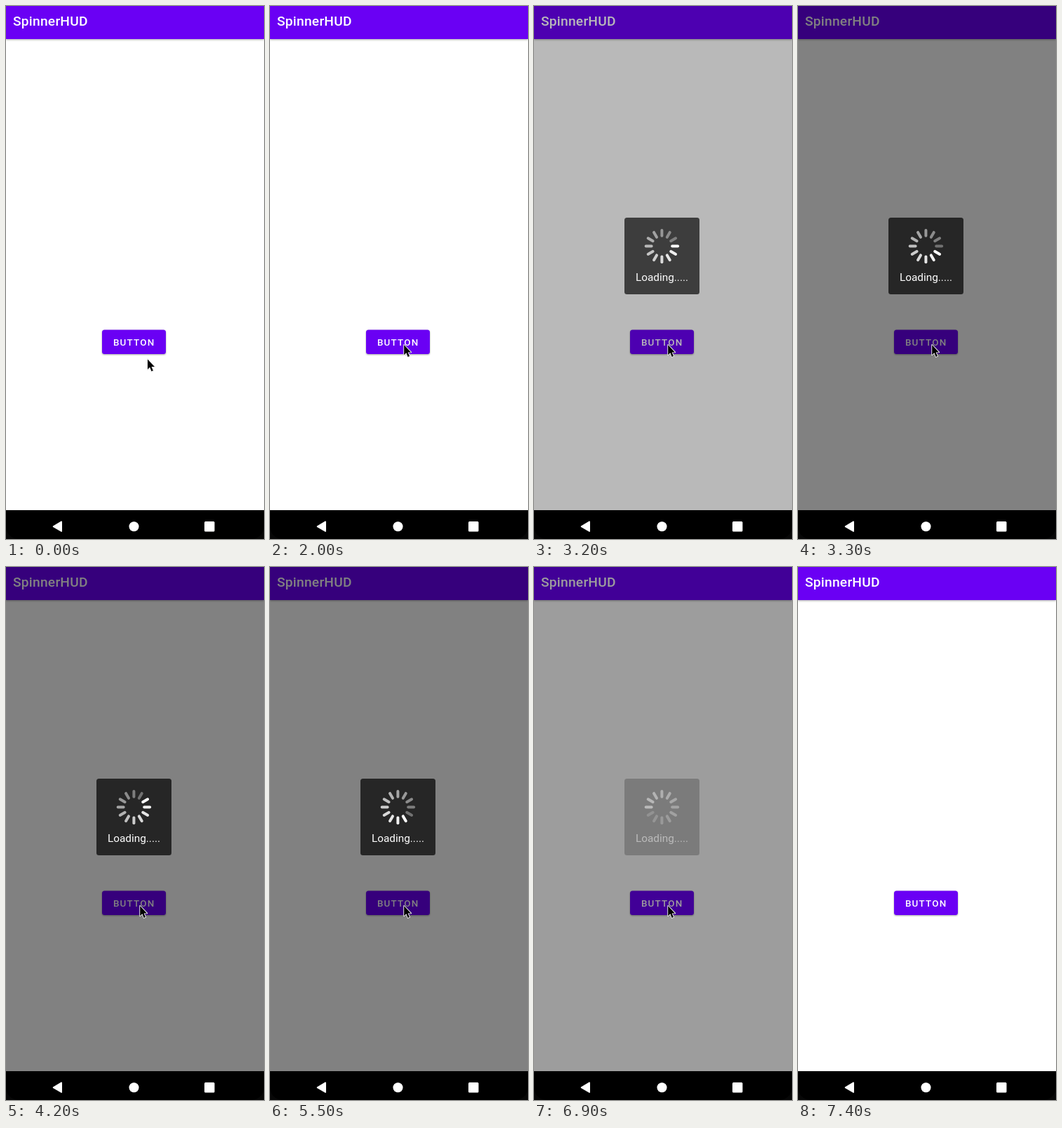
These frames come from a looping animation (368x758 px, 7.8 s). An HTML page:

```html
<!DOCTYPE html>
<html lang="en">
<head>
<meta charset="utf-8">
<title>SpinnerHUD</title>
<style>
  html, body { margin: 0; width: 100%; height: 100%; overflow: hidden; background: #fff; }
  svg { display: block; width: 368px; height: 758px; }
  text { font-family: Roboto, sans-serif; fill: #fff; }
  .title { font-size: 19.2px; font-weight: 500; letter-spacing: .0125em; }
  .label { font-size: 13.45px; font-weight: 500; letter-spacing: .0893em; }
  .loading { font-size: 15.36px; text-anchor: middle; }
  .bar { filter: drop-shadow(0 1px 1.5px rgba(0, 0, 0, .35)); }
</style>
</head>
<body>
<svg viewBox="0 0 368 758">
  <defs>
    <clipPath id="buttonClip"><rect x="137" y="460.5" width="91" height="34.5" rx="3.5"/></clipPath>
    <clipPath id="screenClip"><rect width="368" height="717"/></clipPath>
  </defs>

  <g clip-path="url(#screenClip)">
    <rect width="368" height="717" fill="#fff"/>
    <rect class="bar" y="-10" width="368" height="57" fill="#6a00f4"/>
    <text class="title" x="10" y="28.2">SpinnerHUD</text>

    <rect id="button" x="137" y="460.5" width="91" height="34.5" rx="3.5" fill="#6a00f4"/>
    <g clip-path="url(#buttonClip)">
      <circle id="ripple" cx="191" cy="482" fill="#fff"/>
    </g>
    <text class="label" x="152.9" y="483">BUTTON</text>

    <rect id="dim" width="368" height="717" fill="#000"/>
    <g id="hud">
      <rect x="129" y="301" width="107" height="109" rx="3.5" fill="#000" fill-opacity=".7"/>
      <g id="spinner" stroke="#fff" stroke-width="4" stroke-linecap="round"></g>
      <text class="loading" x="182.5" y="390.5">Loading.....</text>
    </g>
  </g>

  <rect y="717" width="368" height="41" fill="#000"/>
  <path d="M0 740A18 18 0 0 0 18 758H0ZM368 740A18 18 0 0 1 350 758H368Z" fill="#070707"/>
  <path d="M67.5 740.2L79.2 733.3V747.1Z" fill="#fff" stroke="#fff" stroke-width="1.6" stroke-linejoin="round"/>
  <circle cx="182.5" cy="740.2" r="7" fill="#fff"/>
  <rect x="283" y="733" width="14.5" height="14.5" rx="1.5" fill="#fff"/>

  <path id="cursor" d="M0 0V14.2L3.2 11.3L5.5 17L7.8 16L5.5 10.4H9.9Z" fill="#000" stroke="#fff"
    stroke-width="1.8" stroke-linejoin="round" paint-order="stroke"
    style="filter: drop-shadow(0 .8px .7px rgba(0, 0, 0, .35))"/>
</svg>
<script>
const LOOP = 7800, TICK = 100;
const $ = id => document.getElementById(id);
const clamp = v => Math.min(1, Math.max(0, v));
const progress = (t, start, length) => clamp((t - start) / length);
const easeOut = (p, power) => 1 - (1 - p) ** power;

// time, x, y of the pointer tip
const pointer = [
  [0, 202, 502.5], [100, 202, 501], [200, 202, 501], [300, 201, 496],
  [500, 197, 483], [700, 193, 494], [1000, 190.8, 514], [1100, 190.8, 515.5],
  [1200, 190.8, 515.5], [1500, 191, 499], [1800, 192.5, 481], [1900, 192.5, 481],
  [2000, 191.2, 482], [7100, 191.2, 482], [7200, 193, 560], [7300, 196, 690], [7400, 198, 780]
];

function pointerAt(t) {
  const next = pointer.findIndex(step => step[0] > t);
  if (next < 0) return pointer[pointer.length - 1].slice(1);
  const [t0, x0, y0] = pointer[next - 1], [t1, x1, y1] = pointer[next];
  const p = (t - t0) / (t1 - t0);
  return [x0 + (x1 - x0) * p, y0 + (y1 - y0) * p];
}

const SPOKES = 12;
for (let i = 0; i < SPOKES; i++) {
  const spoke = document.createElementNS("http://www.w3.org/2000/svg", "path");
  spoke.setAttribute("d", "M0 -14.8V-22.7");
  spoke.setAttribute("transform", `translate(182.4 341.6) rotate(${i * 360 / SPOKES})`);
  $("spinner").append(spoke);
}

function drawSpinner(t) {
  const head = 3 + Math.floor((t - 3200) / 88 + .3);
  [...$("spinner").children].forEach((spoke, i) => {
    const age = (((i - head) % SPOKES) + SPOKES) % SPOKES;
    spoke.setAttribute("stroke-opacity", 1 - .65 * age / (SPOKES - 1));
  });
}

function drawButton(t) {
  const press = progress(t, 2400, 300);
  const release = progress(t, 2900, 300);
  const lift = press * (1 - release);
  $("ripple").setAttribute("r", 60 * press);
  $("ripple").setAttribute("opacity", .24 * (press > 0 ? 1 - release : 0));
  $("button").style.filter =
    `drop-shadow(0 ${1 + 1.5 * lift}px ${1 + lift}px rgba(0, 0, 0, .35))`;
}

function draw(t) {
  const [x, y] = pointerAt(t);
  $("cursor").setAttribute("transform", `translate(${x} ${y})`);
  drawButton(t);
  const enter = progress(t, 3100, 180), exit = progress(t, 6860, 180);
  $("dim").setAttribute("opacity", .495 * (enter - exit));
  $("hud").setAttribute("opacity", easeOut(enter, 3.8) - easeOut(exit, 4.8));
  drawSpinner(t);
}

const begin = performance.now();
function frame() {
  const t = (performance.now() - begin) % LOOP;
  draw(Math.floor(t / TICK) * TICK);
  requestAnimationFrame(frame);
}
frame();
</script>
</body>
</html>
```
